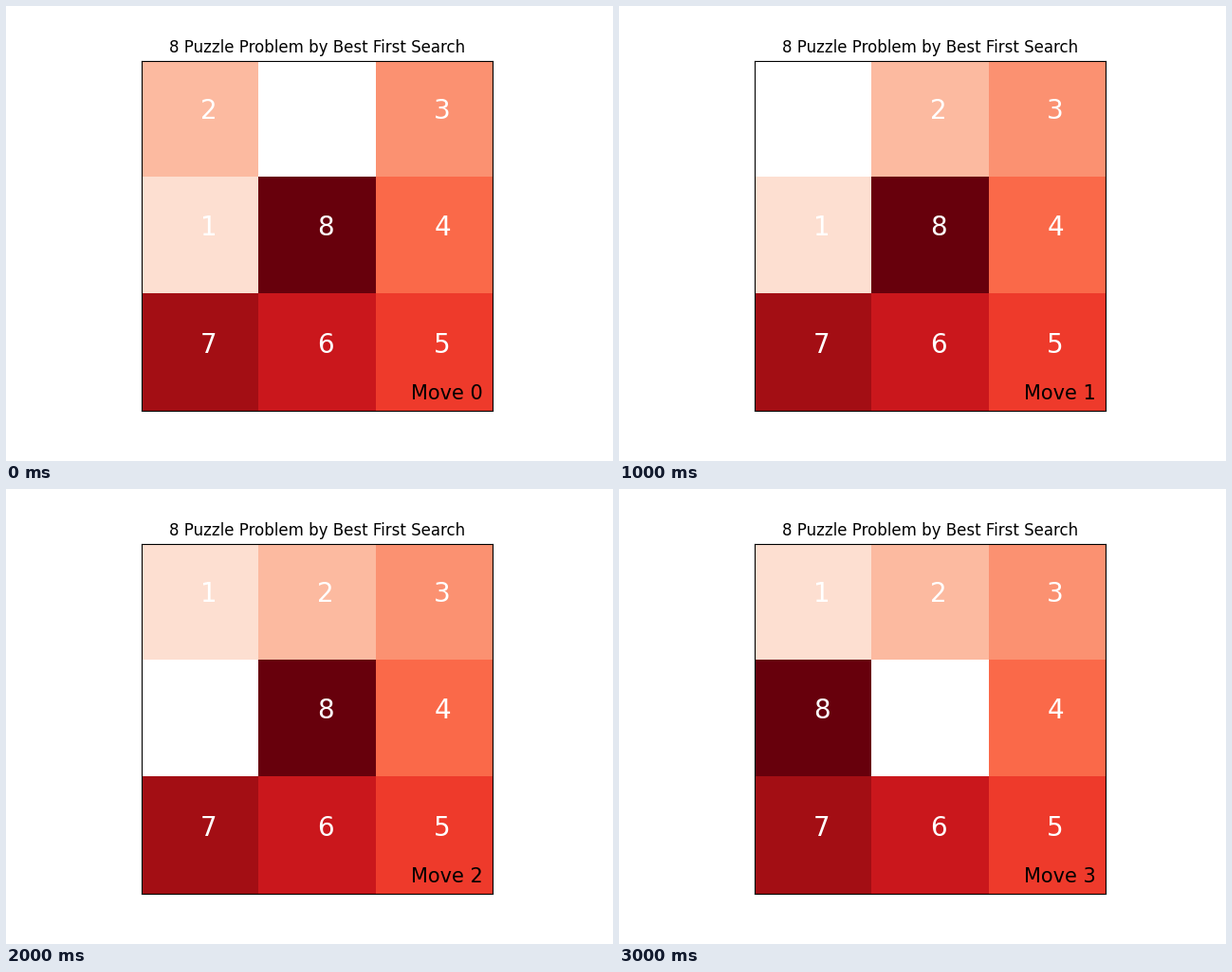
A matplotlib script for the animation above (4 s loop, 640 by 480 pixels).

```python
import matplotlib.pyplot as plt
import numpy as np
from matplotlib.animation import FuncAnimation

START = [[2, 0, 3], [1, 8, 4], [7, 6, 5]]
BLANK_PATH = [(0, 1), (0, 0), (1, 0), (1, 1)]  # (row, column) of the gap


def board_after(moves):
    board = np.array(START)
    for gap, tile in zip(BLANK_PATH[:moves], BLANK_PATH[1:moves + 1]):
        board[gap], board[tile] = board[tile], board[gap]
    return board


def masked(board):
    return np.ma.masked_equal(board, 0)


plt.rcParams["font.family"] = "DejaVu Sans"
fig, ax = plt.subplots(figsize=(6.4, 4.8), dpi=100)
ax.set_title("8 Puzzle Problem by Best First Search", fontsize=12)
ax.set_xticks([])
ax.set_yticks([])

tiles = ax.imshow(masked(board_after(0)), cmap="Reds", vmin=0, vmax=8,
                  interpolation="nearest")
digits = {(row, col): ax.text(col, row, "", fontsize=20, color="white")
          for row, col in np.ndindex(3, 3)}
counter = ax.text(1.8, 2.4, "", fontsize=15, color="black")


def update(move):
    board = board_after(move)
    tiles.set_data(masked(board))
    for cell, digit in digits.items():
        digit.set_text(str(board[cell]) if board[cell] else "")
    counter.set_text(f"Move {move}")
    return [tiles, counter, *digits.values()]


anim = FuncAnimation(fig, update, frames=len(BLANK_PATH), interval=1000,
                     repeat=True, repeat_delay=0)
plt.show()
```
